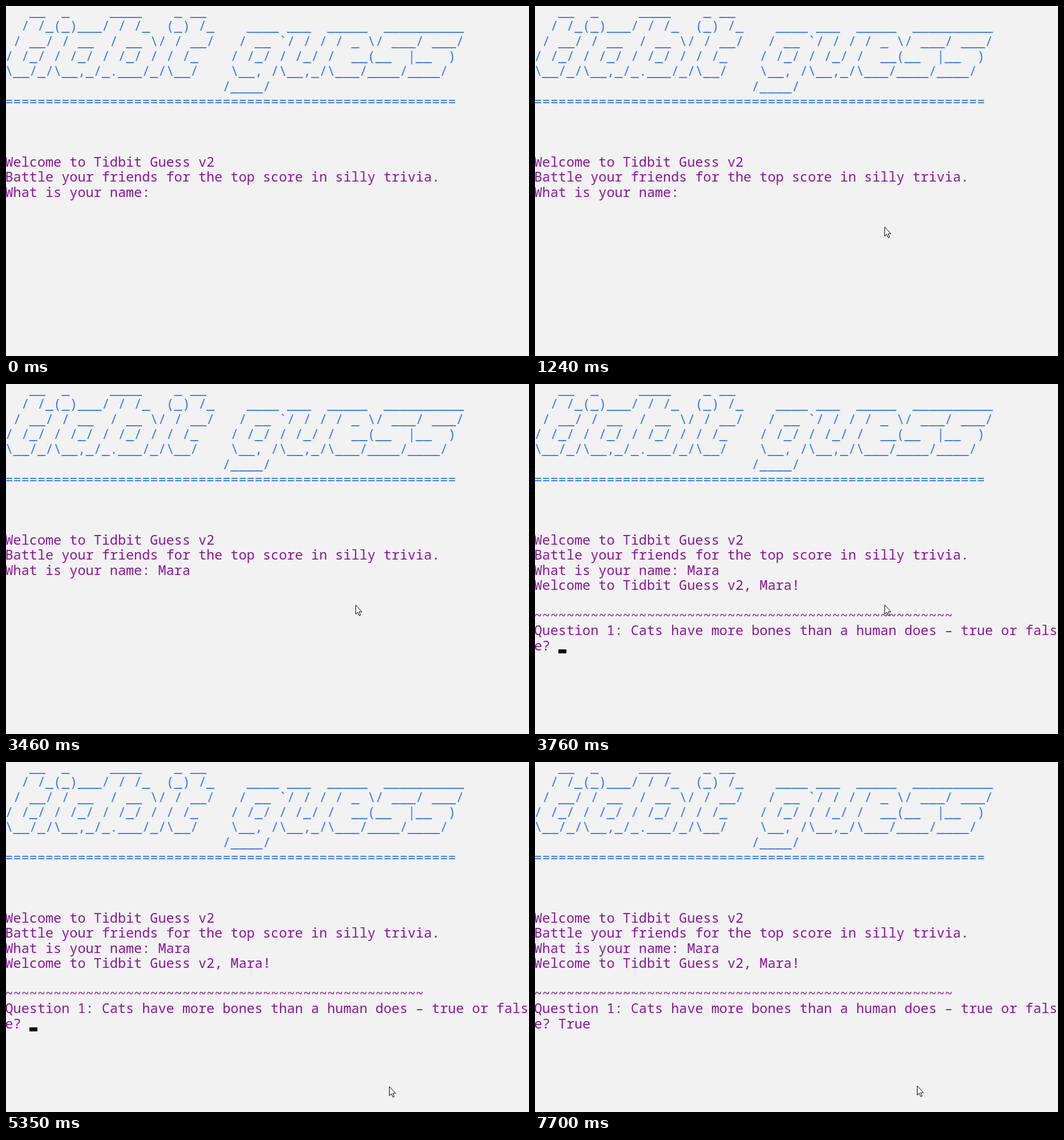
An HTML page for the animation above (8000 ms loop, 916 by 612 pixels).

```html
<!DOCTYPE html>
<html lang="en">
<head>
<meta charset="utf-8">
<title>Trivia in the terminal</title>
<style>
html, body { margin: 0; width: 100%; height: 100%; overflow: hidden; }
body { position: relative; background: #f2f2f2; }

pre {
  position: absolute;
  left: -1.5px;
  top: -5.3px;
  margin: 0;
  font: 23.5px/26.4px "Noto Sans Mono", monospace;
  font-variant-ligatures: none;
  color: #881798;
}
.banner { color: #3b78ff; }
.typed { display: inline-block; }

.typed, .question, .caret, .pointer {
  animation: 8s step-end infinite;
}
.name { animation-name: type-name; }
.answer { animation-name: type-answer; }
.question { animation-name: ask; }
.caret {
  position: absolute;
  left: 0;
  top: 0;
  width: 14px;
  height: 7px;
  background: #0c0c0c;
  animation-name: caret;
}
.pointer {
  position: absolute;
  left: 0;
  top: 0;
  width: 13px;
  height: 21px;
  animation-name: point;
}

@keyframes type-name {
  0% { clip-path: inset(0 100% 0 0); }
  31% { clip-path: inset(0 75% 0 0); }
  35.625% { clip-path: inset(0 50% 0 0); }
  38.625% { clip-path: inset(0 25% 0 0); }
  40.125%, 100% { clip-path: inset(0 0 0 0); }
}
@keyframes type-answer {
  0% { clip-path: inset(0 100% 0 0); }
  87.625% { clip-path: inset(0 75% 0 0); }
  89% { clip-path: inset(0 50% 0 0); }
  90.5% { clip-path: inset(0 25% 0 0); }
  91.875%, 100% { clip-path: inset(0 0 0 0); }
}
@keyframes ask {
  0% { opacity: 0; }
  47%, 100% { opacity: 1; }
}
@keyframes caret {
  0% { opacity: 0; transform: translate(266px, 332px); }
  17% { opacity: 1; transform: translate(266px, 332px); }
  22.875% { opacity: 0; transform: translate(266px, 332px); }
  31% { opacity: 1; transform: translate(281px, 332px); }
  35.625% { opacity: 1; transform: translate(295px, 332px); }
  38.625% { opacity: 1; transform: translate(309px, 332px); }
  40.125% { opacity: 1; transform: translate(323px, 332px); }
  43.25% { opacity: 0; transform: translate(323px, 332px); }
  47%, 63.75%, 76.375% { opacity: 1; transform: translate(41px, 464px); }
  57.375%, 70.625%, 82.375% { opacity: 0; transform: translate(41px, 464px); }
  87.625% { opacity: 1; transform: translate(55px, 464px); }
  89% { opacity: 1; transform: translate(69px, 464px); }
  90.5% { opacity: 1; transform: translate(83px, 464px); }
  91.875% { opacity: 1; transform: translate(97px, 464px); }
  96.25%, 100% { opacity: 0; transform: translate(97px, 464px); }
}
@keyframes point {
  0% { transform: translate(827px, 640px); }
  1.625% { transform: translate(827px, 600px); }
  3.125% { transform: translate(764px, 546px); }
  4.625% { transform: translate(714px, 504px); }
  6% { transform: translate(664px, 461px); }
  7.5% { transform: translate(626px, 429px); }
  9% { transform: translate(594px, 401px); }
  10.375% { transform: translate(576px, 386px); }
  11.875% { transform: translate(587px, 387px); }
  14.125% { transform: translate(600px, 395px); }
  15.5% { transform: translate(612px, 386px); }
  62.25% { transform: translate(622px, 416px); }
  63.75% { transform: translate(645px, 487px); }
  65.375% { transform: translate(665px, 548px); }
  66.875% { transform: translate(671px, 567px); }
  70.625%, 100% { transform: translate(669px, 566px); }
}
</style>
</head>
<body>
<pre>
<span class="banner">   __  _     ____    _ __
  / /_(_)___/ / /_  (_) /_    ____ ___  _____  __________
 / __/ / __  / __ \/ / __/   / __ `/ / / / _ \/ ___/ ___/
/ /_/ / /_/ / /_/ / / /_    / /_/ / /_/ /  __(__  |__  )
\__/_/\__,_/_.___/_/\__/    \__, /\__,_/\___/____/____/
                           /____/
========================================================</span>



Welcome to Tidbit Guess v2
Battle your friends for the top score in silly trivia.
What is your name: <span class="typed name">Mara</span>
<span class="question">Welcome to Tidbit Guess v2, Mara!

~~~~~~~~~~~~~~~~~~~~~~~~~~~~~~~~~~~~~~~~~~~~~~~~~~~~
Question 1: Cats have more bones than a human does – true or fals
e? <span class="typed answer">True</span></span></pre>
<div class="caret"></div>
<svg class="pointer" viewBox="0 0 13 21">
  <path d="M.5 .5V16.5L4 13L6.7 19.2L9 18.2L6.5 12.2H11.3Z" fill="#fff" stroke="#000"/>
</svg>
</body>
</html>
```
